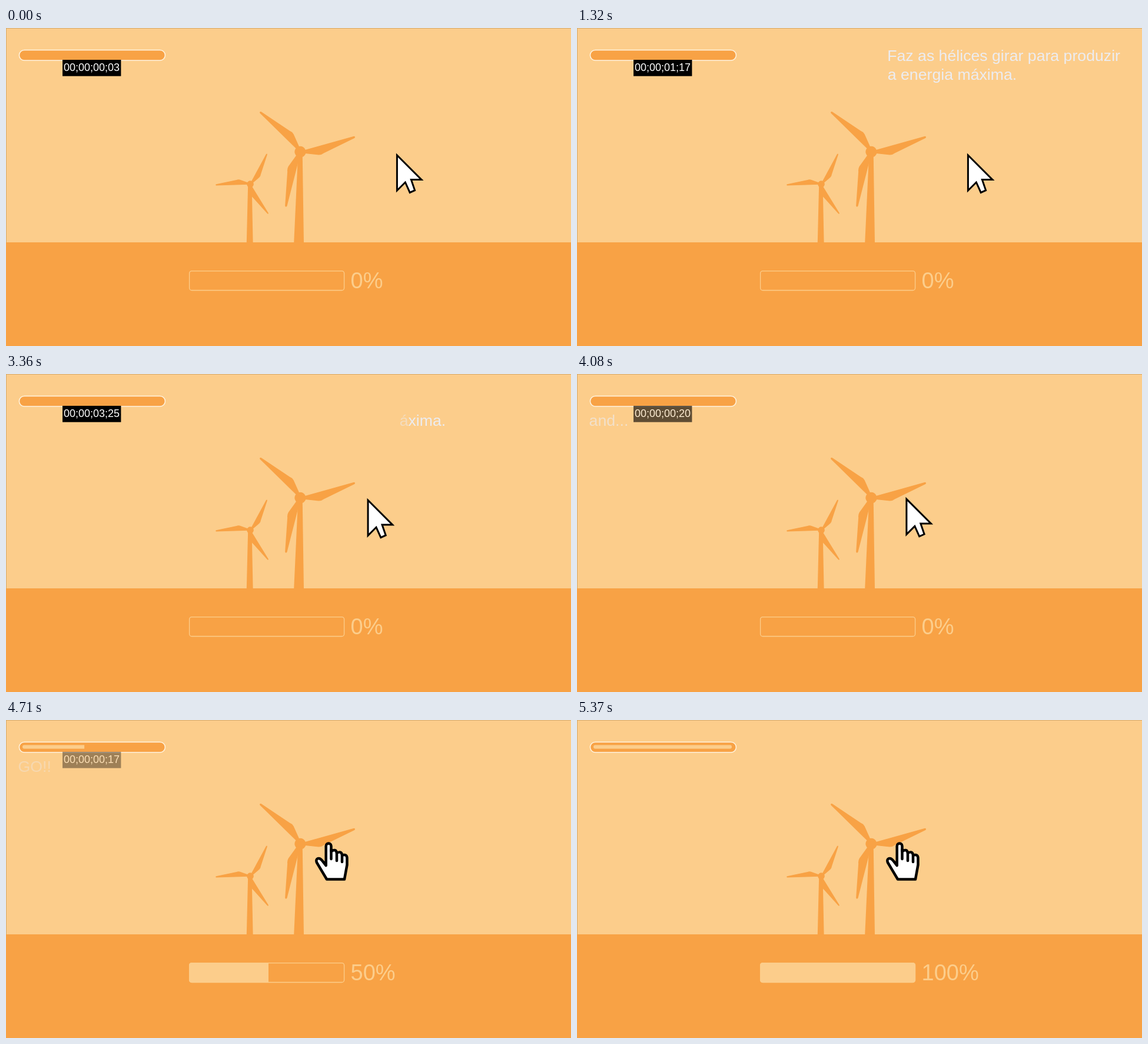
Animation of 960x540 px, one loop 5.4 s. Source, as an HTML page:

```html
<!DOCTYPE html>
<html lang="pt">
<head>
<meta charset="utf-8">
<title>Energia eólica</title>
<style>
  html, body { margin: 0; width: 100%; height: 100%; overflow: hidden; background: #fccd8b; }
  svg { display: block; width: 960px; height: 540px; }
  text { font-family: "Liberation Sans", Arial, sans-serif; font-kerning: none; white-space: pre; }
  .dark { fill: #f8a245; }
  .light { fill: #fccd8b; }
  .title { font-size: 26.67px; fill: #ececf0; }
  .cursor { fill: #fff; stroke: #000; }
</style>
</head>
<body>
<svg viewBox="0 0 960 540">
  <defs>
    <path id="blade" d="M4 -1 L95 -1.6 Q98 0 95 1.8 L38 12.6 Q34 14.5 29 13.3 L5 4Z"/>
    <g id="rotor">
      <circle r="9.6"/>
      <use href="#blade"/>
      <use href="#blade" transform="rotate(120)"/>
      <use href="#blade" transform="rotate(240)"/>
    </g>
    <clipPath id="timeClip"><rect id="timeFill" x="28" y="40" width="0" height="12"/></clipPath>
    <clipPath id="powerClip"><rect id="powerFill" x="311" y="410" width="0" height="38"/></clipPath>
  </defs>

  <rect class="light" width="960" height="540"/>
  <path d="M0 .5H960M.5 1V364" stroke="#7a5a2a" stroke-opacity=".3" fill="none"/>
  <rect class="dark" y="364" width="960" height="176"/>

  <g class="dark">
    <path d="M496.3 212H503.7L506 365H489.2Z"/>
    <use href="#rotor" transform="translate(500 210.3) rotate(-15.3)"/>
    <path d="M411.2 266H417.6L419.6 365H408.8Z"/>
    <use href="#rotor" transform="translate(415 265.2) rotate(178.8) scale(.61)"/>
  </g>

  <rect class="dark" x="22.4" y="37.4" width="248" height="17.6" rx="8.8" stroke="#fff4e0" stroke-width="1.5"/>
  <rect class="light" x="28" y="42.5" width="235" height="6.3" rx="3" clip-path="url(#timeClip)"/>

  <rect x="311.6" y="412.6" width="263" height="32.9" rx="4" fill="none" stroke="#fccd8b" stroke-width="1.3"/>
  <rect class="light" x="311" y="412" width="264" height="34" rx="4.5" clip-path="url(#powerClip)"/>
  <text id="percent" class="light" x="585.5" y="441.5" font-size="38"></text>

  <text id="line1" class="title" x="527.2" y="56"></text>
  <text id="line2" class="title" x="527.8" y="88"></text>
  <text id="call" class="title" x="20.6" y="87.6"></text>

  <g id="clock">
    <rect x="96" y="54" width="99.4" height="27.7"/>
    <text id="code" x="98" y="73.3" font-size="18" fill="#fff"></text>
  </g>

  <path id="arrow" class="cursor" stroke-width="3"
    d="M664.4 216 L706 257.6 H688.4 L694.6 275.6 L686.2 279.4 L678.4 262 L664.4 276Z"/>
  <g id="hand" class="cursor" stroke-width="4.5" stroke-linejoin="round" stroke-linecap="round">
    <path d="M543.7 247 V214 a4.4 4.4 0 0 1 8.8 0 V223 Q561 218 562 226 Q570 221.5 571 229.5
      Q579.5 227 579.5 235 V246 L575 270.5 H545 L528 242 Q526 236.5 530 235.2 Q533.5 234.3 537 238.5Z"/>
    <path fill="none" d="M552.5 220V236M562 226V239M571 230V241"/>
  </g>
</svg>
<script>
  const STEP = 30, STEPS = 180;
  const AND = 116, GO = 140;
  const $ = id => document.getElementById(id);
  const clamp = v => Math.min(1, Math.max(0, v));
  const ramp = (s, from, to) => clamp((s - from) / (to - from));
  const pad = n => String(n).padStart(2, "0");

  function splitChars(el, str) {
    return [...str].map(ch => {
      const span = document.createElementNS("http://www.w3.org/2000/svg", "tspan");
      span.textContent = ch;
      el.append(span);
      return span;
    });
  }

  const chars = [
    ...splitChars($("line1"), "Faz as hélices girar para produzir"),
    ...splitChars($("line2"), "a energia máxima.")
  ];

  // Each clip restarts the timecode and fades out at its end.
  const clips = [
    { start: -3, text: "", fade: [STEPS, STEPS + 1] },
    { start: AND, text: "and...", fade: [133.6, 140] },
    { start: GO, text: "GO!!", fade: [152.9, 159.4] }
  ];

  function draw(s) {
    // Letters appear, then vanish, one after another.
    const shown = 1.17 * s - 0.4;
    const gone = 1.63 * (s - 84.08);
    chars.forEach((c, i) => c.setAttribute("fill-opacity", clamp(shown - i) * (1 - clamp(gone - i))));

    const clip = clips.filter(c => s >= c.start).pop();
    const n = s - clip.start;
    const alpha = 1 - ramp(s, ...clip.fade);
    $("code").textContent = `00;00;${pad(Math.floor(n / 30))};${pad(n % 30)}`;
    $("call").textContent = clip.text;
    $("clock").setAttribute("opacity", alpha);
    $("call").setAttribute("opacity", alpha);

    const u = ramp(s, 88, 138);
    const e = u * u * (3 - 2 * u);
    $("arrow").setAttribute("transform", `translate(${-105 * e} ${-3.6 * e})`);
    $("arrow").setAttribute("visibility", s < GO ? "visible" : "hidden");
    $("hand").setAttribute("visibility", s < GO ? "hidden" : "visible");

    const power = ramp(s, GO - 0.4, 173.6);
    $("timeFill").setAttribute("width", 235 * ramp(s, GO, 178));
    $("powerFill").setAttribute("width", 264 * power);
    $("percent").textContent = `${Math.floor(power * 100 - (power < 1 ? 1 : 0) * 0.8 * ramp(power, 0, 0.1))}%`;
  }

  const begin = performance.now();
  function tick() {
    draw(Math.floor(Math.max(0, performance.now() - begin) / STEP) % STEPS);
    requestAnimationFrame(tick);
  }
  tick();
</script>
</body>
</html>
```
